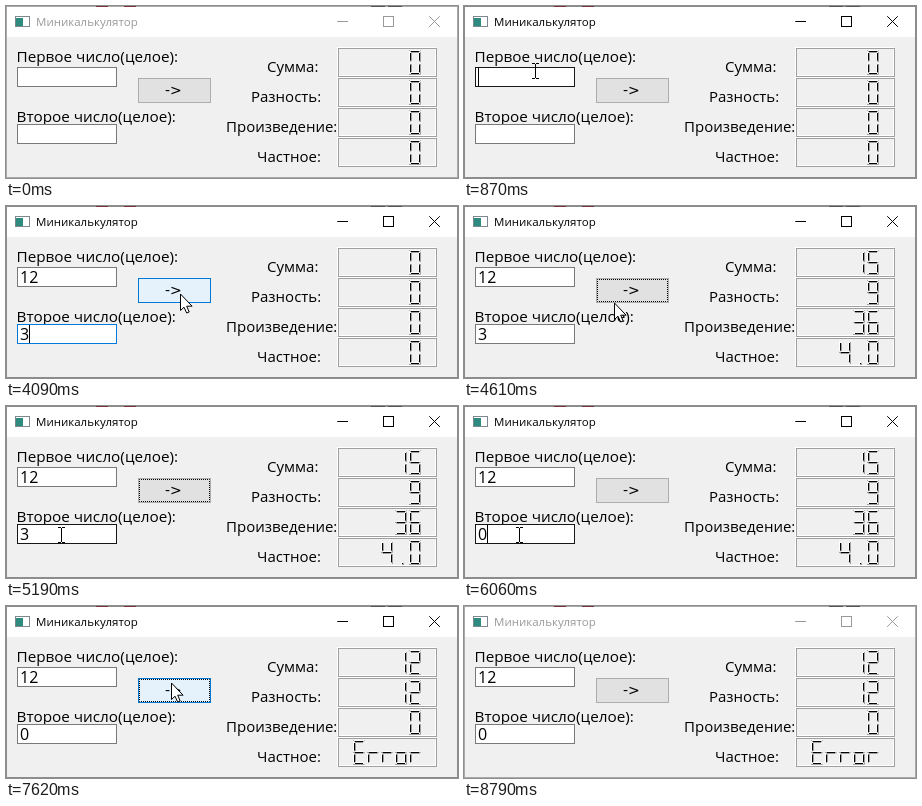
These frames come from a looping animation (452 by 172 pixels, 8.85 s). An HTML page with a canvas:

```html
<!DOCTYPE html>
<html lang="ru">
<head>
<meta charset="utf-8">
<title>Миникалькулятор</title>
<style>
html, body { margin: 0; height: 100%; overflow: hidden; background: #f0f0f0; }
canvas { display: block; }
</style>
</head>
<body>
<canvas id="stage" width="452" height="172"></canvas>
<script>
const ctx = document.getElementById('stage').getContext('2d');
const LOOP = 8850;
const FONT = '"Open Sans", "Noto Sans", sans-serif';
const WIDE_FONT = '"DejaVu Sans", sans-serif';

// Each track lists [time, value]; a value holds until the next one.
const tracks = {
  focus: [[0, ''], [467, 'first'], [1810, 'second'], [4237, 'button'], [5267, 'second'], [7093, 'button'], [8790, '']],
  first: [[0, ''], [1450, '1'], [1530, '12']],
  second: [[0, ''], [2620, '3'], [6060, '0']],
  pressed: [[0, false], [4237, true], [4383, false], [7093, true], [7400, false]],
  selected: [[0, false], [5410, true], [6060, false]],
  caretReset: [467, 1450, 1530, 1810, 2620, 5267, 6060].map(t => [t, t]),
  results: [
    [0, ['0', '0', '0', '0']],
    [4383, ['15', '9', '36', '4.0']],
    [7240, ['12', '12', '0', 'Error']]
  ]
};
const valueAt = (name, t) => tracks[name].reduce((v, [time, next]) => time <= t ? next : v, null);

const easeIn = u => u * u;
const easeOut = u => 1 - (1 - u) ** 2;
const easeBoth = u => u * u * (3 - 2 * u);

// Pointer moves: first step, last step, number of steps, end point, easing.
const moves = [
  [60, 630, 8, [71, 69], easeOut],
  [790, 870, 2, [71, 65], easeBoth],
  [3200, 3930, 11, [174, 88], easeBoth],
  [4530, 4970, 7, [57, 137], easeBoth],
  [5050, 5190, 3, [55, 129], easeBoth],
  [6580, 7020, 7, [163, 75], easeBoth],
  [7620, 8050, 7, [288, 180], easeIn]
];

function pointerAt(t) {
  let pos = [230, 185];
  for (const [start, end, steps, target, ease] of moves) {
    if (t < start) break;
    const step = Math.floor((t - start) / (end - start) * (steps - 1) + 1e-6) + 1;
    const u = ease(Math.min(1, step / steps));
    pos = pos.map((v, i) => v + (target[i] - v) * u);
  }
  return pos.map(Math.floor);
}

const fields = { first: [11, 61, 100, 20], second: [11, 118, 100, 20] };
const button = [132, 72, 73, 25];
const inside = ([px, py], [x, y, w, h]) => px >= x && px < x + w && py >= y && py < y + h;

function fill(color, x, y, w, h) {
  ctx.fillStyle = color;
  ctx.fillRect(x, y, w, h);
}
function frame(color, x, y, w, h) {
  ctx.lineCap = 'butt';
  ctx.strokeStyle = color;
  ctx.strokeRect(x + .5, y + .5, w - 1, h - 1);
}
function text(str, x, y, size = 15, color = '#000', font = FONT) {
  ctx.font = `${size}px ${font}`;
  ctx.fillStyle = color;
  ctx.fillText(str, x, y);
}
function line(color, ...points) {
  ctx.lineCap = 'square';
  ctx.strokeStyle = color;
  ctx.beginPath();
  points.forEach(([x, y]) => ctx.lineTo(x + .5, y + .5));
  ctx.stroke();
}

function drawWindow(active) {
  fill('#f0f0f0', 0, 0, 452, 172);
  fill('#fff', 0, 0, 452, 31);
  frame(active ? '#8c8c8c' : '#aaa', 0, 0, 452, 172);
  for (const x of [90, 118]) fill('#7a3038', x, 0, 12, 1);
  for (const x of [365, 382]) fill('#555', x, 0, 14, 1);

  fill('#fff', 9, 10, 15, 12);
  fill('#2f8a80', 10, 12, 7, 8);
  frame('#7d8790', 9, 10, 15, 11);

  const ink = active ? '#000' : '#999';
  text('Миникалькулятор', 30, 20, 11.5, ink);
  line(ink, [331, 15], [341, 15]);
  frame(ink, 377, 10, 11, 11);
  line(ink, [423, 10], [433, 20]);
  line(ink, [433, 10], [423, 20]);

  text('Первое число(целое):', 10.5, 56, 15.3);
  text('Второе число(целое):', 10.5, 116, 15.3);
  text('Сумма:', 261, 66);
  text('Разность:', 245, 96);
  text('Произведение:', 220, 126);
  text('Частное:', 251, 156);
}

function drawField(name, t, focus, pointer) {
  const [x, y, w, h] = fields[name];
  const value = valueAt(name, t);
  const focused = focus === name;
  const selected = focused && valueAt('selected', t);
  const border = inside(pointer, fields[name]) ? '#171717' : focused ? '#0078d7' : '#7a7a7a';
  fill('#fff', x, y, w, h);
  frame(border, x, y, w, h);
  if (selected) fill('#0078d7', 14, y + 1, 9, 18);
  text(value, 14, y + 16, 16, selected ? '#fff' : '#000');
  const lit = Math.floor((t - valueAt('caretReset', t)) / 580) % 2 === 0;
  if (focused && lit && !selected) fill('#000', 14 + value.length * 9, y + 1, 1, 18);
}

function drawButton(t, focus, pointer) {
  const [x, y, w, h] = button;
  const [face, border] = valueAt('pressed', t) ? ['#cce4f7', '#005499']
    : inside(pointer, button) ? ['#e5f1fb', '#0078d7'] : ['#e1e1e1', '#adadad'];
  fill(face, x, y, w, h);
  frame(border, x, y, w, h);
  if (focus === 'button') {
    ctx.setLineDash([1, 1]);
    ctx.lineDashOffset = .5;
    frame('#000', x + 1, y + 1, w - 2, h - 2);
    ctx.setLineDash([]);
  }
  text('->', 159, 89, 14, '#000', WIDE_FONT);
}

// Bevelled seven-segment digits: L is the segment length, W its width.
const L = 12, W = 2, H = W / 2;
const LIGHT = '#fff', DARK = '#a0a0a0';
// Origin, corner points, and for each edge whether it is lit.
const segments = [
  [[0, 0], [[0, 0], [L - 1, 0], [L - W - 1, W], [W, W]], '1000'],
  [[0, 1], [[0, 0], [W, W], [W, L - H - 2], [0, L - 2]], '1001'],
  [[L - 1, 1], [[0, 0], [0, L - 2], [-W, L - H - 2], [-W, W]], '0011'],
  [[0, L], [[0, 0], [W, -H], [L - W - 1, -H], [L - 1, 0], [L - W - 1, H], [W, H]], '111000'],
  [[0, L + 1], [[0, 0], [W, H], [W, L - W - 2], [0, L - 2]], '1001'],
  [[L - 1, L + 1], [[0, 0], [0, L - 2], [-W, L - W - 2], [-W, H]], '0011'],
  [[0, 2 * L], [[0, 0], [W, -W], [L - W - 1, -W], [L - 1, 0]], '1110'],
  [[L / 2, 2 * L], [[0, 0], [W, 0], [W, -W], [0, -W]], '0011']
];
const glyphs = {
  0: '012456', 1: '25', 2: '02346', 3: '02356', 4: '1235', 5: '01356',
  6: '013456', 9: '012356', E: '01346', r: '34', o: '3456', '.': '7'
};

function drawSegment(x, y, [[dx, dy], corners, lit]) {
  const points = corners.map(([px, py]) => [x + dx + px, y + dy + py]);
  ctx.fillStyle = '#000';
  ctx.beginPath();
  points.forEach(([px, py]) => ctx.lineTo(px + .5, py + .5));
  ctx.fill();
  points.forEach((p, i) => line(lit[i] === '1' ? LIGHT : DARK, p, points[(i + 1) % points.length]));
}

function drawDisplay(value, y) {
  frame(LIGHT, 331, y, 99, 29);
  frame(DARK, 332, y + 1, 99, 29);
  [...value.padStart(5)].forEach((ch, i) => {
    for (const s of glyphs[ch] || '') drawSegment(347 + 14 * i, y + 3, segments[s]);
  });
}

const arrow = new Path2D('M.5 .5V16.5L4 13.2L6.7 19L9.2 18L6.7 12.2H11.6Z');

function drawPointer([x, y]) {
  if (Object.values(fields).some(box => inside([x, y], box))) {
    for (const edge of [y - 8, y + 7]) {
      fill('#000', x - 3, edge, 3, 1);
      fill('#000', x + 1, edge, 3, 1);
    }
    fill('#000', x, y - 7, 1, 14);
    return;
  }
  ctx.save();
  ctx.translate(x, y);
  ctx.fillStyle = '#fff';
  ctx.strokeStyle = '#000';
  ctx.fill(arrow);
  ctx.stroke(arrow);
  ctx.restore();
}

function draw(now) {
  const t = now % LOOP;
  const focus = valueAt('focus', t);
  const pointer = pointerAt(t);
  drawWindow(focus !== '');
  drawField('first', t, focus, pointer);
  drawField('second', t, focus, pointer);
  drawButton(t, focus, pointer);
  valueAt('results', t).forEach((value, i) => drawDisplay(value, 41 + 30 * i));
  drawPointer(pointer);
}

const begin = performance.now();
function tick() {
  draw(performance.now() - begin);
  requestAnimationFrame(tick);
}
tick();
</script>
</body>
</html>
```
